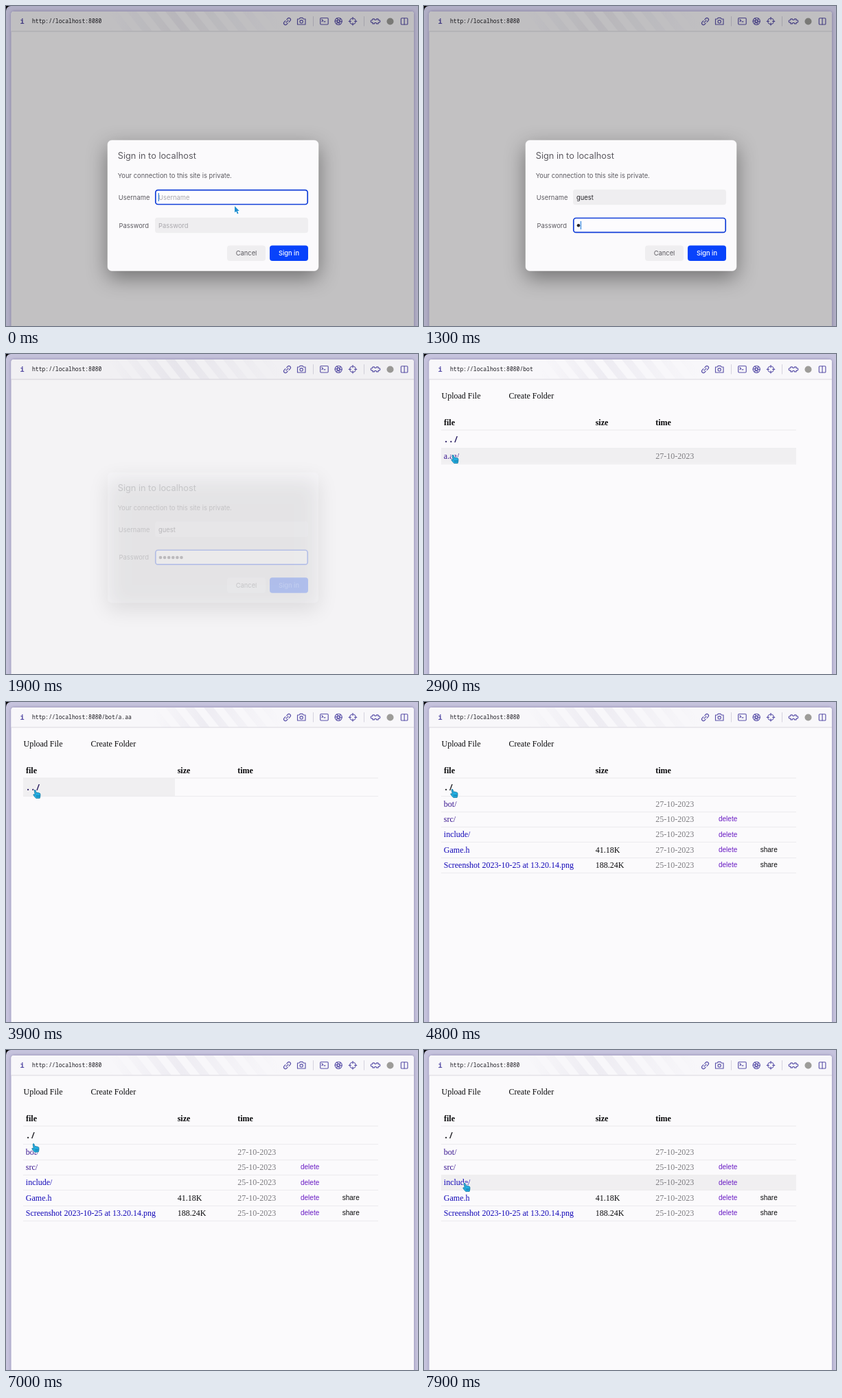
Write an HTML page with a canvas that moves like this. It is 600 px wide and 467 px high and loops after 8000 ms.

```html
<!DOCTYPE html>
<html lang="en">
<head>
<meta charset="utf-8">
<title>File server demo</title>
<style>
html, body { margin: 0; width: 100%; height: 100%; overflow: hidden; background: #c6c3dd; }
canvas { display: block; width: 600px; height: 467px; }
</style>
</head>
<body>
<canvas id="stage"></canvas>
<script>
const W = 600, H = 467, LOOP = 8000;
const canvas = document.getElementById('stage');
const ratio = window.devicePixelRatio || 1;
canvas.width = Math.round(W * ratio);
canvas.height = Math.round(H * ratio);
const ctx = canvas.getContext('2d');

const SANS = 'Inter, "Open Sans", sans-serif';
const SERIF = '"Liberation Serif", "Times New Roman", serif';
const ARIAL = '"Liberation Sans", Arial, sans-serif';
const MONO = '"Noto Sans Mono", "DejaVu Sans Mono", monospace';
const INK = '#5b52a9', LINK = '#1207b8', VISITED = '#36128f';

const USER = 'guest', HOST = 'http://localhost:8080';

const ROOT = [
  { name: 'bot/', color: VISITED, time: '27-10-2023' },
  { name: 'src/', color: VISITED, time: '25-10-2023', del: true },
  { name: 'include/', color: LINK, time: '25-10-2023', del: true },
  { name: 'Game.h', color: LINK, size: '41.18K', time: '27-10-2023', del: true, share: true },
  { name: 'Screenshot 2023-10-25 at 13.20.14.png', color: LINK, size: '188.24K', time: '25-10-2023', del: true, share: true }
];
const BOT = [{ name: 'a.aa/', color: VISITED, time: '27-10-2023' }];

// Pages in order of the time they open
const VISITS = [
  { at: 0, path: '', rows: null },
  { at: 2100, path: '', rows: ROOT },
  { at: 2900, path: '/bot', rows: BOT },
  { at: 3500, path: '/bot/a.aa', rows: [] },
  { at: 4100, path: '/bot', rows: BOT },
  { at: 4600, path: '', rows: ROOT },
  { at: 5500, path: '/src', rows: [] },
  { at: 6500, path: '', rows: ROOT }
];

// Pointer stops: time, x, y
const STOPS = [
  [2000, 333, 292], [2700, 42, 147], [3100, 42, 147], [3300, 44, 148],
  [3550, 44, 148], [3850, 42, 128], [4300, 42, 128], [4700, 41, 127],
  [4950, 41, 127], [5300, 39, 169], [5600, 39, 169], [6000, 38, 127],
  [6700, 38, 127], [7300, 42, 146], [7850, 59, 194]
];

const clamp = v => Math.max(0, Math.min(1, v));
const smooth = v => v * v * (3 - 2 * v);

function box(x, y, w, h, r, fill, stroke, line = 1) {
  ctx.beginPath();
  ctx.roundRect(x, y, w, h, r);
  if (fill) { ctx.fillStyle = fill; ctx.fill(); }
  if (stroke) { ctx.strokeStyle = stroke; ctx.lineWidth = line; ctx.stroke(); }
}

function text(str, x, y, font, color, align = 'left') {
  ctx.font = font;
  ctx.fillStyle = color;
  ctx.textAlign = align;
  ctx.fillText(str, x, y);
}

function poly(points, close) {
  ctx.beginPath();
  points.forEach(([x, y], i) => i ? ctx.lineTo(x, y) : ctx.moveTo(x, y));
  if (close) ctx.closePath();
}

function ring(x, y, r) {
  ctx.beginPath();
  ctx.arc(x, y, r, 0, Math.PI * 2);
  ctx.stroke();
}

function line(x1, y1, x2, y2) {
  poly([[x1, y1], [x2, y2]]);
  ctx.stroke();
}

function frame() {
  ctx.fillStyle = '#050507';
  ctx.fillRect(0, 0, 10, 10);
  box(0, 0, W + 12, H + 12, 7, '#c6c3dd');
  ctx.save();
  ctx.shadowColor = 'rgba(70,60,120,.45)';
  ctx.shadowBlur = 4 * ratio;
  box(7.5, 8, 586.5, H + 10, 4, '#fbfafc');
  ctx.restore();
}

function stripes(from) {
  ctx.save();
  ctx.beginPath();
  ctx.rect(from, 8, 400 - from, 28.5);
  ctx.clip();
  const fade = ctx.createLinearGradient(from, 0, 400, 0);
  fade.addColorStop(0, 'rgba(232,230,238,0)');
  fade.addColorStop(.4, 'rgba(232,230,238,.65)');
  fade.addColorStop(1, 'rgba(232,230,238,0)');
  ctx.fillStyle = fade;
  for (let x = 120; x < 410; x += 28) {
    poly([[x, 8], [x + 14, 8], [x + 37, 37], [x + 23, 37]], true);
    ctx.fill();
  }
  ctx.restore();
}

function icons() {
  ctx.save();
  ctx.strokeStyle = INK;
  ctx.lineWidth = 1.15;
  ctx.lineCap = ctx.lineJoin = 'round';

  // link
  ctx.save();
  ctx.translate(409.5, 22.5);
  ctx.rotate(-Math.PI / 4);
  for (const s of [-1, 1]) {
    poly([[s * 1.3, -2.4], [s * 4, -2.4]]);
    ctx.arc(s * 3.6, 0, 2.4, -Math.PI / 2, Math.PI / 2, s < 0);
    ctx.lineTo(s * 1.3, 2.4);
    ctx.stroke();
  }
  line(-2.2, 0, 2.2, 0);
  ctx.restore();

  // camera
  poly([[424.5, 19], [427, 19], [428.2, 17.3], [432, 17.3], [433.2, 19], [436, 19], [436, 27], [424.5, 27]], true);
  ctx.stroke();
  ring(430.2, 22.8, 2.2);

  // terminal
  box(457.7, 17.5, 11.5, 9.5, 1.2, null, INK, 1.15);
  poly([[460, 19.7], [461.7, 21.2], [460, 22.7]]);
  ctx.stroke();
  line(463, 22.8, 465, 22.8);

  // aperture
  ring(484.2, 22.3, 5.1);
  for (let i = 0; i < 6; i++) {
    const a = i * Math.PI / 3, b = a + 1.9;
    line(484.2 + 5 * Math.cos(a), 22.3 + 5 * Math.sin(a), 484.2 + 2.2 * Math.cos(b), 22.3 + 2.2 * Math.sin(b));
  }

  // target
  ring(505, 22.3, 4.3);
  for (let i = 0; i < 4; i++) {
    const c = Math.round(Math.cos(i * Math.PI / 2)), s = Math.round(Math.sin(i * Math.PI / 2));
    line(505 + 2.6 * c, 22.3 + 2.6 * s, 505 + 5.8 * c, 22.3 + 5.8 * s);
  }

  // puzzle piece
  ctx.beginPath();
  ctx.moveTo(534, 18.8);
  ctx.lineTo(536.4, 18.8);
  ctx.arc(538, 18.8, 1.6, Math.PI, 0, true);
  ctx.lineTo(542, 18.8);
  ctx.lineTo(542, 20.7);
  ctx.arc(543, 22.3, 1.8, -2, 2);
  ctx.lineTo(542, 25.9);
  ctx.lineTo(539.6, 25.9);
  ctx.arc(538, 25.9, 1.6, 0, Math.PI, true);
  ctx.lineTo(534, 25.9);
  ctx.lineTo(534, 24);
  ctx.arc(533, 22.3, 1.8, 1.1, 5.1);
  ctx.closePath();
  ctx.stroke();

  // extension badge
  ctx.fillStyle = '#9d9c99';
  ctx.beginPath();
  ctx.arc(559.5, 22.5, 5, 0, Math.PI * 2);
  ctx.fill();

  // split view
  box(575.3, 17.7, 9.6, 9.3, 1, null, INK, 1.15);
  line(580.1, 17.7, 580.1, 27);

  ctx.strokeStyle = '#d5d3de';
  ctx.lineWidth = 1;
  line(447.5, 15.5, 447.5, 29);
  line(521.5, 15.5, 521.5, 29);
  ctx.restore();
}

function toolbar(path) {
  box(7.5, 8, 586.5, 28.5, [4, 4, 0, 0], '#f8f7fa');
  stripes(path.length > 6 ? 215 : 150 + path.length * 5);
  ctx.fillStyle = '#d9d7e0';
  ctx.fillRect(7.5, 36.5, 586.5, 1);
  text('i', 23.7, 26, 'bold 10.5px ' + MONO, INK, 'center');
  text(HOST + path, 38, 25.3, '500 8.05px ' + MONO, '#1b1a20');
  icons();
}

const rowTop = i => 137.5 + i * 22.35;

function listing(visit, pointer) {
  const serif = '12px ' + SERIF, bold = 'bold 12px ' + SERIF;
  text('Upload File', 25.5, 64.5, serif, '#0a0a0c');
  text('Create Folder', 123.5, 64.5, serif, '#0a0a0c');
  text('file', 29, 104.3, bold, '#0a0a0c');
  text('size', 249.7, 104.3, bold, '#0a0a0c');
  text('time', 337.2, 104.3, bold, '#0a0a0c');

  const rule = y => {
    ctx.fillStyle = '#ecebee';
    ctx.fillRect(25, y, 517, 1);
  };
  const top = visit.path === '';
  const onTop = pointer.y > 111 && pointer.y < 137;
  if (!top && onTop) {
    ctx.fillStyle = '#f0eff1';
    ctx.fillRect(25, 111, 221, 26);
  }
  rule(110.5);
  rule(137);
  text(top ? './' : '../', 28.6, 129, '600 12px ' + MONO, top ? '#25242a' : '#2b1f63');

  visit.rows.forEach((row, i) => {
    const y = rowTop(i), base = y + 15;
    if (pointer.y >= y && pointer.y < y + 22.35 && pointer.x < 542) {
      ctx.fillStyle = '#f0eff1';
      ctx.fillRect(25, y, 517, 22);
    }
    rule(Math.round(y + 22));
    text(row.name, 28.8, base, serif, row.color);
    if (row.size) text(row.size, 249.7, base, serif, '#0a0a0c');
    text(row.time, 337.2, base, serif, '#7d7c80');
    if (row.del) text('delete', 429, base - .6, '10px ' + ARIAL, '#6a1cc4');
    if (row.share) text('share', 489.7, base - .6, '10px ' + ARIAL, '#0a0a0c');
  });
}

function field(y, focused) {
  if (focused) box(217.8, y + .8, 221.4, 20.9, 3.5, '#fdfcfe', '#123fd8', 1.7);
  else box(217, y, 223, 22.5, 4, '#efeef0');
}

function caret(x, y) {
  ctx.fillStyle = '#3f8ee0';
  ctx.fillRect(x, y, 1.3, 12);
}

function dialog(t, fade) {
  const font = '9.4px ' + SANS, label = '#5c5a60', hint = '#aaa8ad';
  ctx.save();
  ctx.globalAlpha = 1 - fade;
  ctx.translate(0, -30.5 * fade);
  ctx.save();
  ctx.shadowColor = 'rgba(0,0,0,.42)';
  ctx.shadowBlur = 30 * ratio;
  ctx.shadowOffsetY = 10 * ratio;
  box(148, 196, 307, 190.5, 6, '#fbfafc');
  ctx.restore();
  if (!fade) box(148, 196, 307, 190.5, 6, null, 'rgba(255,255,255,.6)', .8);

  text('Sign in to localhost', 162.7, 222.8, '12.75px ' + SANS, label);
  text('Your connection to this site is private.', 162.7, 250.8, font, label);
  text('Username', 163.8, 282.8, font, label);
  text('Password', 164.6, 323.6, font, label);

  const onPassword = t >= 1000;
  const typed = USER.slice(0, Math.max(0, Math.floor((t - 200) / 100)));
  const dots = Math.max(0, Math.min(6, Math.floor((t - 1200) / 90)));

  field(267.8, !onPassword);
  text(typed || 'Username', 222, 282.8, font, typed ? '#242328' : hint);
  if (!onPassword) {
    ctx.font = font;
    caret(221.7 + ctx.measureText(typed).width, 273);
  }

  field(308.7, onPassword);
  if (!dots) text('Password', 222, 323.6, font, hint);
  ctx.fillStyle = '#242328';
  for (let i = 0; i < dots; i++) {
    ctx.beginPath();
    ctx.arc(225 + i * 6.1, 320.2, 2.3, 0, Math.PI * 2);
    ctx.fill();
  }
  if (onPassword && !fade) caret(221.7 + dots * 6.1, 314);

  box(322, 349.5, 56, 22.5, 4, '#efeef0');
  text('Cancel', 350, 364.2, font, label, 'center');
  box(384, 349.5, 56, 22.5, 4, '#0843fb');
  text('Sign in', 412, 364.2, '500 9.3px ' + SANS, '#fff', 'center');
  ctx.restore();
}

function pointerAt(t) {
  let i = STOPS.length - 1;
  while (i > 0 && STOPS[i][0] > t) i--;
  const a = STOPS[i], b = STOPS[i + 1] || a;
  const p = a === b ? 0 : smooth(clamp((t - a[0]) / (b[0] - a[0])));
  return { x: a[1] + (b[1] - a[1]) * p, y: a[2] + (b[2] - a[2]) * p };
}

function arrow({ x, y }) {
  ctx.save();
  ctx.translate(x, y);
  poly([[0, 0], [0, 9.6], [2.2, 7.6], [3.9, 11.4], [5.5, 10.7], [3.9, 7.1], [6.8, 6.9]], true);
  ctx.lineJoin = 'round';
  ctx.strokeStyle = 'rgba(255,255,255,.85)';
  ctx.lineWidth = 1.8;
  ctx.stroke();
  ctx.fillStyle = '#1f8fd0';
  ctx.fill();
  ctx.restore();
}

function hand({ x, y }) {
  ctx.save();
  ctx.translate(x, y);
  ctx.beginPath();
  ctx.moveTo(-1, 1);
  ctx.quadraticCurveTo(0, -.8, 1.1, .9);
  ctx.lineTo(2, 4.2);
  ctx.quadraticCurveTo(3.4, 3.2, 4.2, 4.4);
  ctx.quadraticCurveTo(5.5, 3.6, 6.2, 4.9);
  ctx.quadraticCurveTo(7.8, 4.6, 8, 6.4);
  ctx.quadraticCurveTo(8.4, 9.5, 7.2, 12.4);
  ctx.lineTo(1.8, 12.6);
  ctx.quadraticCurveTo(-.8, 10.2, -2.3, 7.6);
  ctx.quadraticCurveTo(-2.2, 6, -.5, 7);
  ctx.lineTo(.3, 7.5);
  ctx.closePath();
  ctx.lineJoin = 'round';
  ctx.strokeStyle = 'rgba(255,255,255,.9)';
  ctx.lineWidth = 2.2;
  ctx.stroke();
  ctx.fillStyle = '#22aee2';
  ctx.fill();
  ctx.strokeStyle = '#15698f';
  ctx.lineWidth = .7;
  ctx.stroke();
  line(2.6, 8, 2.8, 10.8);
  line(4.5, 8, 4.6, 10.8);
  line(6.3, 8, 6.3, 10.6);
  ctx.restore();
}

function draw(t) {
  const visit = VISITS.filter(v => v.at <= t).pop();
  const fade = clamp((t - 1840) / 80);
  const pointer = pointerAt(t);
  const overLink = t > 2100 && pointer.x < 75;

  ctx.setTransform(ratio, 0, 0, ratio, 0, 0);
  ctx.clearRect(0, 0, W, H);
  frame();
  toolbar(visit.path);
  if (visit.rows) listing(visit, overLink ? pointer : { x: pointer.x, y: pointer.y });

  if (fade < 1) {
    const dim = Math.pow(1 - fade, 1.5);
    ctx.fillStyle = `rgba(0,0,0,${.11 * dim})`;
    ctx.fillRect(0, 0, W, H);
    box(7.5, 8, 586.5, H, [4, 4, 0, 0], `rgba(0,0,0,${.135 * dim})`);
    dialog(t, fade);
  }

  if (overLink) hand(pointer);
  else if (t < 300 || t >= 2100) arrow(pointer);
}

const start = performance.now();
function tick() {
  draw((performance.now() - start) % LOOP);
  requestAnimationFrame(tick);
}
draw(0);
requestAnimationFrame(tick);
</script>
</body>
</html>
```
